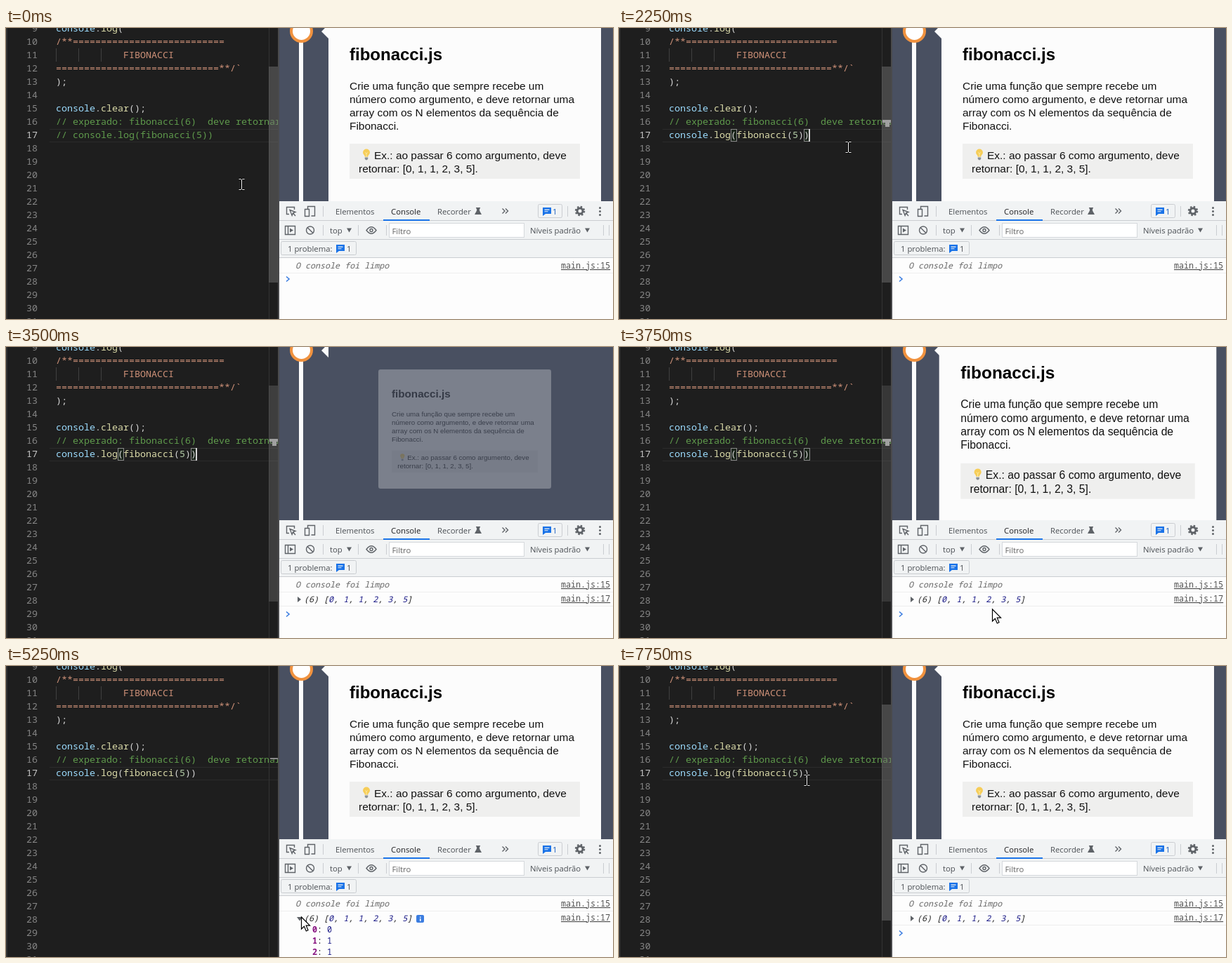
Animation of 864 by 415 pixels, one loop 8000 ms. Source, as an HTML page:

```html
<!DOCTYPE html>
<html lang="pt">
<head>
<meta charset="utf-8">
<title>Fibonacci</title>
<style>
html, body { margin: 0; width: 100%; height: 100%; overflow: hidden; background: #1e1e1e; }
svg { display: block; }
text { white-space: pre; }
.code { font: 13.333px "Noto Sans Mono", "DejaVu Sans Mono", monospace; fill: #d4d4d4; }
.num { fill: #858585; text-anchor: end; }
.obj { fill: #9cdcfe; }
.fn { fill: #dcdcaa; }
.val { fill: #b5cea8; }
.str { fill: #ce9178; }
.com { fill: #5f9a4c; }
.page { font: 15.45px "Liberation Sans", Arial, sans-serif; fill: #111; }
.page .title { font-size: 24px; font-weight: bold; fill: #000; }
.ui { font: 11.3px "Open Sans", "Noto Sans", sans-serif; fill: #4b4f54; }
.log { font: 11.7px "Noto Sans Mono", "DejaVu Sans Mono", monospace; fill: #222; }
.it { font-style: italic; }
.dig { fill: #1a1a86; }
.key { fill: #881280; font-weight: bold; }
.link { fill: #505050; text-decoration: underline; }
.icon { fill: none; stroke: #5f6368; stroke-width: 1.4; }
.solid { fill: #5f6368; }
.rule { stroke: #cacdd1; fill: none; }
</style>
</head>
<body>
<svg width="864" height="415" viewBox="0 0 864 415">
  <defs>
    <clipPath id="editorClip"><rect width="387.5" height="415"/></clipPath>
    <clipPath id="pageClip"><rect x="389" width="475" height="247"/></clipPath>
    <path id="chat" d="M0 0h12v9H4l-4 3z M2.5 2.6h7v1.1h-7z M2.5 5.2h5v1.1h-5z" fill="#1a73e8" fill-rule="evenodd"/>
    <path id="chevron" d="M0 0l4 3.5-4 3.5" fill="none" stroke="#3b7de0" stroke-width="1.6"/>
    <path id="ibeam" d="M-3.500-7.500h3l1 1 1-1h3M-3.500 7.500h3l1-1 1 1h3M.5-7V7" fill="none"/>
  </defs>

  <!-- editor -->
  <g clip-path="url(#editorClip)">
    <rect width="388" height="415" fill="#1e1e1e"/>
    <rect width="2" height="415" fill="#333"/>
    <path d="M62 144.5H388M62 162.5H388" stroke="#2b2b2b"/>
    <path d="M71.5 29v19M103.5 29v19M135.5 29v19" stroke="#404040"/>
    <g id="brackets" fill="#0064001a" stroke="#888">
      <rect x="159.5" y="144.5" width="8" height="17"/>
      <rect x="263.5" y="144.5" width="8" height="17"/>
    </g>
    <g id="code" class="code"></g>
    <path d="M374.5 0V415" stroke="#333"/>
    <rect id="slider" x="374" y="55" width="13" height="308" fill="#797979" fill-opacity=".45"/>
    <path id="lineMark" d="M376 131h12v2h-12z" fill="#8a8a8a"/>
    <path id="bracketMark" d="M375 131h12v4h-2v6h-6v-6h-4z" fill="#a0a0a0"/>
    <rect id="caret" y="144" width="2" height="18" fill="#d4d4d4"/>
  </g>
  <rect x="387" width="2" height="415" fill="#4a4a4c"/>

  <!-- web page -->
  <g clip-path="url(#pageClip)">
    <rect x="389" width="475" height="247" fill="#495061"/>
    <rect x="417" width="6" height="247" fill="#fcfcfc"/>
    <circle cx="420.500" cy="4.500" r="14.500" fill="#fff" stroke="#f0923f" stroke-width="4"/>
    <path d="M449 5l10-10v20z" fill="#fcfcfc"/>
    <g id="card" class="page">
      <rect x="459" y="-17" width="388" height="268" rx="5" fill="#fcfcfc"/>
      <text class="title" x="489" y="46">fibonacci.js</text>
      <text x="489" y="88">Crie uma função que sempre recebe um</text>
      <text x="489" y="107">número como argumento, e deve retornar uma</text>
      <text x="489" y="126">array com os N elementos da sequência de</text>
      <text x="489" y="145">Fibonacci.</text>
      <rect x="489" y="165" width="328" height="50" fill="#efefee"/>
      <g transform="translate(513 181) scale(.9)">
        <path d="M-2.500 3c0-3-3-4-3-7a5.500 5.500 0 0 1 11 0c0 3-3 4-3 7z" fill="#f6cd58"/>
        <path d="M-2-4l2 2 2-2M0-2v5" fill="none" stroke="#fdf0b0"/>
        <path d="M-2.500 4h5v2.500l-1.500 1.500h-2l-1.500-1.500z" fill="#8b9298"/>
      </g>
      <text x="524" y="187">Ex.: ao passar 6 como argumento, deve</text>
      <text x="502" y="206">retornar: [0, 1, 1, 2, 3, 5].</text>
    </g>
  </g>

  <!-- developer tools -->
  <rect x="389" y="247" width="475" height="81" fill="#f1f3f4"/>
  <rect x="389" y="328" width="475" height="87" fill="#fdfdfd"/>
  <path class="rule" d="M389 274.500H864M389 301.500H864M389 327.500H864M451.500 254v15M799.500 254v15M451.500 281v15M501.500 281v15M541.500 281v15M850.500 281v15M858.500 281v15"/>
  <rect x="537" y="273" width="66" height="2" fill="#1a73e8"/>
  <g class="icon">
    <path d="M403 265.500h-3.500v-10h11v3.500M404 259.500l8 3-3.500 1.400-1.400 3.500zM408.500 264l3.500 4"/>
    <path d="M429.500 258v-3.500h10v13.500h-5M425.500 258.500h6v10h-6z"/>
    <path d="M397.500 282.500h14v12h-14zM401.500 283v11"/>
    <circle cx="433" cy="288.500" r="5.500"/><path d="M429 284.500l8 8"/>
    <path d="M513 288.500q7-9.500 14 0q-7 9.500-14 0z"/><circle cx="520" cy="288.500" r="2"/>
    <path d="M706.500 257.500l3.500 3.500-3.500 3.500M711 257.500l3.500 3.500-3.500 3.500"/>
    <circle cx="817" cy="261" r="4" stroke-width="3"/>
    <circle cx="817" cy="261" r="6" stroke-width="2.500" stroke-dasharray="2.400 2.312"/>
  </g>
  <g class="solid">
    <path d="M404 285.500l5 3-5 3z"/>
    <path d="M669 256h6v1.500h-1v3l3 5.500h-10l3-5.500v-3h-1z"/>
    <circle cx="845.500" cy="256.500" r="1.500"/><circle cx="845.500" cy="261.500" r="1.500"/><circle cx="845.500" cy="266.500" r="1.500"/>
    <path d="M485 285.500h7l-3.500 6zM824 285.500h7l-3.500 6z"/>
  </g>
  <rect class="rule" x="757.500" y="251.500" width="34" height="19" rx="2"/>
  <rect class="rule" x="391.500" y="304.500" width="107" height="19" rx="2"/>
  <rect x="545.500" y="278.500" width="192" height="20" fill="#fff" stroke="#d5d8dc"/>
  <use href="#chat" x="764" y="256"/><use href="#chat" x="470" y="309"/>
  <g class="ui">
    <text x="469" y="266">Elementos</text>
    <text x="548" y="266" fill="#202124">Console</text>
    <text x="614" y="266">Recorder</text>
    <text x="778" y="266" fill="#1a5fc0">1</text>
    <text x="461" y="293">top</text>
    <text x="549.500" y="294" fill="#666">Filtro</text>
    <text x="746" y="293">Níveis padrão</text>
    <text x="401" y="319">1 problema:</text>
    <text x="485" y="319">1</text>
  </g>
  <g class="log">
    <text class="it" x="412" y="343" fill="#666">O console foi limpo</text>
    <text class="link" x="790" y="343">main.js:15</text>
    <path d="M389 349.500H864" stroke="#eee"/>
    <g id="result">
      <path id="resultRule" d="M389 369.500H864" stroke="#eee"/>
      <text class="it" x="424" y="364">(6) [<tspan class="dig">0</tspan>, <tspan class="dig">1</tspan>, <tspan class="dig">1</tspan>, <tspan class="dig">2</tspan>, <tspan class="dig">3</tspan>, <tspan class="dig">5</tspan>]</text>
      <text class="link" x="790" y="363">main.js:17</text>
      <path id="closed" class="solid" d="M415 356l5 4-5 4z"/>
    </g>
    <g id="opened">
      <path class="solid" d="M414 358h8l-4 5.500z"/>
      <rect x="584" y="355" width="11" height="11" rx="2" fill="#3b7de0"/>
      <path d="M589 357.500h1.500v1.500H589zM589 360h1.500v4H589z" fill="#fff"/>
    </g>
    <g id="items">
      <text x="436" y="380"><tspan class="key">0</tspan>: <tspan class="dig">0</tspan></text>
      <text x="436" y="396"><tspan class="key">1</tspan>: <tspan class="dig">1</tspan></text>
      <text x="436" y="412"><tspan class="key">2</tspan>: <tspan class="dig">1</tspan></text>
    </g>
    <use id="prompt" href="#chevron"/>
  </g>

  <!-- pointers, origin at the hot spot -->
  <g id="beam">
    <use href="#ibeam" stroke="#000" stroke-width="2.500"/>
    <use href="#ibeam" stroke="#fff"/>
  </g>
  <path id="arrow" d="M.5 0v17l3.900-3.700 2.900 6.700 2.700-1.200-2.800-6.600h5.300z" fill="#fff" stroke="#000" stroke-width="1.200"/>
</svg>
<script>
const LOOP = 8000;
const $ = id => document.getElementById(id);
const span = (cls, s) => `<tspan class="${cls}">${s}</tspan>`;

const comment17 = span('com', '// console.log(fibonacci(5))');
const call17 = span('obj', 'console') + '.' + span('fn', 'log') + '(' +
  span('fn', 'fibonacci') + '(' + span('val', '5') + '))';
const lines = {
  9: span('obj', 'console') + '.' + span('fn', 'log') + '(' + span('str', '`'),
  10: span('str', '/**' + '='.repeat(27)),
  11: span('str', ' '.repeat(12) + 'FIBONACCI'),
  12: span('str', '='.repeat(29) + '**/`'),
  13: ');',
  15: span('obj', 'console') + '.' + span('fn', 'clear') + '();',
  16: span('com', '// experado: fibonacci(6)  deve retornar'),
  17: comment17
};

let rows = '';
for (let n = 9; n <= 31; n++) {
  const y = 24 + (n - 10) * 19;
  const active = n === 17 ? ' style="fill:#c6c6c6"' : '';
  rows += `<text class="num" x="45" y="${y}"${active}>${n}</text>` +
    `<text id="line${n}" x="71" y="${y}">${lines[n] || ''}</text>`;
}
$('code').innerHTML = rows;

// Each track is a list of [start ms, ...values], held until the next step.
const pointer = [
  [0, 'beam', 335, 223], [250, 'beam', 330, 177], [500, 'beam', 330, 169], [750, 'beam', 326, 170],
  [3250, 'arrow', 417, 130], [3500, ''], [3750, 'arrow', 531, 374], [4000, 'arrow', 491, 372],
  [4250, 'arrow', 442, 355], [4500, 'arrow', 421, 361], [4750, 'arrow', 420, 358],
  [6000, 'arrow', 419, 362], [7000, 'beam', 281, 277], [7250, 'beam', 271, 234],
  [7500, 'beam', 264, 176], [7750, 'beam', 267, 163]
];
const caret = [
  [0, 0], [750, 294], [1250, 0], [1750, 294], [2250, 270], [2750, 0],
  [3250, 270], [3750, 0], [4250, 270], [4750, 0]
];
const card = [[0, 1, 1], [3500, 0.634, 0.28], [3750, 1.017, 1], [4000, 1, 1]];
const slider = [[0, 1], [3500, 0.8], [3750, 0.6], [4000, 0.3], [4250, 0], [7000, 1]];

const at = (track, t) => track.reduce((cur, step) => step[0] <= t ? step : cur);
const show = (id, on) => { $(id).style.display = on ? '' : 'none'; };
const move = (id, x, y) => $(id).setAttribute('transform', `translate(${x} ${y})`);
let typed = null;

function draw(t) {
  const [, kind, x, y] = at(pointer, t);
  for (const id of ['beam', 'arrow']) {
    show(id, id === kind);
    if (id === kind) move(id, x, y);
  }

  const caretX = at(caret, t)[1];
  show('caret', caretX > 0);
  $('caret').setAttribute('x', caretX);

  const called = t >= 2250;
  if (called !== typed) {
    $('line17').innerHTML = called ? call17 : comment17;
    typed = called;
  }
  const matched = called && t < 5000;
  show('brackets', matched);
  show('bracketMark', matched);

  const shade = at(slider, t)[1];
  $('slider').style.opacity = shade;
  show('lineMark', shade === 0);

  const [, scale, alpha] = at(card, t);
  $('card').setAttribute('transform', `translate(653 117) scale(${scale}) translate(-653 -117)`);
  $('card').style.opacity = alpha;

  const logged = t >= 3500;
  const open = t >= 5000 && t < 6250;
  const listed = t >= 5250 && t < 6250;
  show('result', logged);
  show('resultRule', !listed);
  show('closed', !open);
  show('opened', open);
  show('items', listed);
  show('prompt', !listed);
  move('prompt', 399, logged ? 377.5 : 354.5);
}

const start = performance.now();
function tick() {
  draw((performance.now() - start) % LOOP);
  requestAnimationFrame(tick);
}
tick();
</script>
</body>
</html>
```
